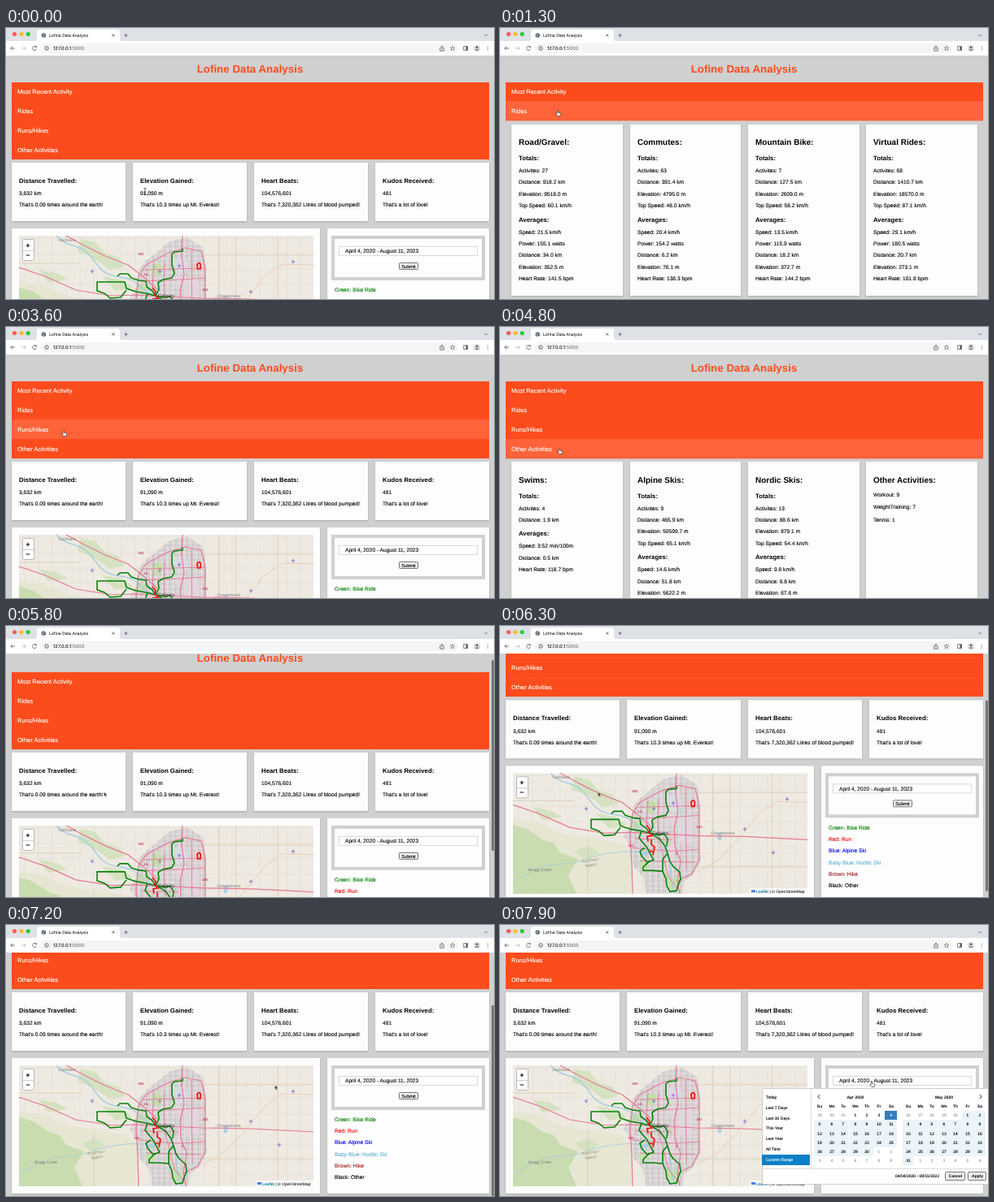
Write an HTML page that moves like this. It is 600 px wide and 334 px high and loops after 8 s.

```html
<!DOCTYPE html>
<html lang="en">
<head>
<meta charset="utf-8">
<title>Lofine Data Analysis</title>
<style>
html, body { margin: 0; width: 100%; height: 100%; overflow: hidden; }
body { position: relative; font-family: "Liberation Sans", Arial, sans-serif; text-rendering: geometricPrecision; color: #000; }
#stage { position: absolute; left: 0; top: 0; width: 600px; height: 334px; overflow: hidden; background: #d0d0d0; }
#stage svg { position: absolute; left: 0; top: 0; overflow: visible; }
#view { position: absolute; left: 0; top: 34px; width: 600px; height: 300px; overflow: hidden; }
#doc { position: absolute; left: 0; top: -34px; width: 600px; animation: scroll 8s infinite; }
#chrome { position: absolute; left: 0; top: 0; width: 600px; height: 34px; font-family: Inter, Roboto, sans-serif; }
/* Text is laid out ten times larger so that small sizes keep exact baselines */
.t { position: absolute; line-height: 0; white-space: nowrap; transform-origin: 0 0; transform: scale(.1); -webkit-text-stroke: 1.2px; }
.c { transform: scale(.1) translateX(-50%); }
.b { font-weight: bold; -webkit-text-stroke: 0; }
.box { position: absolute; box-sizing: border-box; }
.card { background: #fdfdfd; box-shadow: 0 .6px 2px rgba(0, 0, 0, .2); }
.btn { background: #efefef; border: .5px solid #777; border-radius: 1.3px; }

#flow { position: absolute; left: 6.5px; top: 66.6px; width: 587.5px; }
.item { position: relative; height: 23.75px; background: #fc4c1c; box-shadow: 0 .3px #fc4c1c; color: #fff; animation: 8s step-end infinite; }
.panel { position: relative; height: 0; overflow: hidden; animation: 8s ease-out infinite; }
.layer { position: absolute; left: -6.5px; top: 0; }
#rest { position: relative; }
#rest .layer { top: -161.6px; }

#rides { animation-name: hoverRides; }
#runs { animation-name: hoverRuns; }
#other { animation-name: hoverOther; }
#ridesPanel { --h: 220px; animation-name: openRides; }
#runsPanel { --h: 205.5px; animation-name: openRuns; }
#otherPanel { --h: 205px; animation-name: openOther; }
#picker { position: absolute; left: 0; top: 83px; animation: pick 8s step-end infinite; }
#thumb { left: 597px; top: 34px; width: 2.6px; height: 235px; border-radius: 1.3px; background: #767676; animation: thumbMove 8s infinite, thumbShow 8s infinite; }
#cursor { position: absolute; left: 0; top: 0; animation: move 8s ease-in-out infinite; }
#cursor g { animation: 8s step-end infinite; }
#cursor #beam { animation-name: beam; }
#cursor #hand { animation-name: hand; }
#cursor #arrow { animation-name: arrow; }

@keyframes hoverOther { 0% { background: #fc4c1c } 4% { background: #fe6339 } 5.2%, 47% { background: #fc4c1c } 47.2%, 62.5% { background: #fe6339 } 64%, 100% { background: #fc4c1c } }
@keyframes hoverRuns { 0% { background: #fc4c1c } 5.2% { background: #fe6339 } 6.4%, 23.5% { background: #fc4c1c } 23.7%, 46.8% { background: #fe6339 } 47%, 100% { background: #fc4c1c } }
@keyframes hoverRides { 0% { background: #fc4c1c } 6.4% { background: #fe6339 } 23.6%, 100% { background: #fc4c1c } }
@keyframes openRides { 0%, 10% { height: 0 } 12.5%, 20% { height: var(--h) } 22.5%, 100% { height: 0 } }
@keyframes openRuns { 0%, 26% { height: 0 } 28.5%, 42.5% { height: var(--h) } 45%, 100% { height: 0 } }
@keyframes openOther { 0%, 48.75% { height: 0 } 51.25%, 60% { height: var(--h) } 62.5%, 100% { height: 0 } }
@keyframes scroll {
  0%, 71% { transform: none; animation-timing-function: ease-in }
  72.5% { transform: translateY(-10px); animation-timing-function: cubic-bezier(.3, .3, .5, 1) }
  82%, 84% { transform: translateY(-84px) }
  87%, 100% { transform: translateY(-83px) }
}
@keyframes thumbMove {
  0%, 71% { transform: none; animation-timing-function: ease-in }
  72.5% { transform: translateY(8px); animation-timing-function: cubic-bezier(.3, .3, .5, 1) }
  82%, 100% { transform: translateY(65px) }
}
@keyframes thumbShow { 0%, 71% { opacity: 0 } 71.5%, 90% { opacity: 1 } 93%, 100% { opacity: 0 } }
@keyframes pick { 0% { visibility: hidden } 94.5%, 100% { visibility: visible } }
@keyframes move {
  0%, 1.2% { transform: translate(171px, 200px) }
  8.5%, 22.5% { transform: translate(71px, 102px) }
  25%, 45% { transform: translate(71px, 128px) }
  48%, 62.5% { transform: translate(73px, 150px) }
  69%, 86% { transform: translate(120.5px, 204.5px) }
  93%, 100% { transform: translate(457px, 193px) }
}
@keyframes beam { 0% { opacity: 1 } 3%, 100% { opacity: 0 } }
@keyframes hand { 0% { opacity: 0 } 3% { opacity: 1 } 64% { opacity: 0 } 92.5%, 100% { opacity: 1 } }
@keyframes arrow { 0% { opacity: 0 } 64% { opacity: 1 } 92.5%, 100% { opacity: 0 } }
</style>
</head>
<body>
<div id="stage">
  <div id="view">
    <div id="doc">
      <div id="title"></div>
      <div id="flow">
        <div class="item" id="recent"></div>
        <div class="item" id="rides"></div><div class="panel" id="ridesPanel"></div>
        <div class="item" id="runs"></div><div class="panel" id="runsPanel"></div>
        <div class="item" id="other"></div><div class="panel" id="otherPanel"></div>
        <div id="rest"><div class="layer">
          <div id="stats"></div>
          <div class="box card" style="left:6.7px;top:247px;width:379.5px;height:167px"></div>
          <svg width="600" height="420">
            <defs>
              <clipPath id="frame"><rect x="16" y="172" width="362" height="149"/></clipPath>
              <pattern id="farm" width="17" height="19" patternUnits="userSpaceOnUse"><path d="M0 4H17M6 0V19" stroke="#e2dad0" stroke-width=".6"/></pattern>
              <pattern id="blocks" width="7" height="6" patternUnits="userSpaceOnUse"><path d="M0 2H7M3 0V6" stroke="#f3f0ef" stroke-width=".6"/><path d="M5 0V6" stroke="#bfb8b9" stroke-width=".5"/></pattern>
            </defs>
            <g transform="translate(0 84)" clip-path="url(#frame)">
              <rect x="16" y="172" width="362" height="149" fill="#eeeae2"/>
              <rect x="16" y="172" width="362" height="149" fill="url(#farm)"/>
              <path d="M16 228L50 234 74 246 112 252 150 258 165 274 160 321H16Z" fill="#e6e6d3"/>
              <path d="M16 236L34 241 52 254 66 258 74 270 96 278 84 298 94 321H16Z" fill="#c9dcb0"/>
              <path d="M92 176l18 4 12 14 16 4 8 12-18 4-20-14-20-8zM40 214l22 4 14 8-24 4zM118 222l24 4 14 10-22 4zM92 268l18-6 12 8-16 10z" fill="#d5e2c1"/>
              <g id="city"></g>
              <path d="M179 211l8-6 6 5-3 11-9 1zM160 234l9-3 5 6-10 5zM205 299l12 4-2 14-10-4zM170 282l10-2 4 8-10 3z" fill="#c3deac"/>
              <path d="M206 200l15-3 4 18-16 4z" fill="#dadae4"/>
              <g fill="none" stroke="#a9cfdd">
                <path d="M62 172q8 9 20 12t18 9 14 17 26 13 26 12 18 9 14 10 8 20 4 22 6 25" stroke-width="1.5"/>
                <path d="M16 305q18-8 28-14t30-7 32-6 34-8 32 0 20-10" stroke-width=".9"/>
              </g>
              <ellipse cx="178" cy="271" rx="5" ry="2.5" fill="#a9cfdd"/>
              <ellipse cx="270" cy="251" rx="2.3" ry="4.5" fill="#a9cfdd"/>
              <g fill="none" stroke="#d8c9b2" stroke-width=".8"><path d="M283 172V321M262 172V321M334 172V321M241 196H378M241 287H378M16 206H92M108 254V321"/></g>
              <g fill="none" stroke="#e57a93" stroke-width="1.2" stroke-linejoin="round">
                <path d="M16 211L48 222 86 239 130 246 160 245 196 247 242 249 300 250 378 254"/>
                <path d="M74 172L96 184 122 197 150 208 168 222 186 238"/>
                <path d="M163 321L162 284 160 250 163 222 172 208 198 194 220 187 240 191 245 212 245 278 236 296 218 305"/>
                <path d="M217 172L216 196 219 220 214 240 215 262 222 280 218 305 221 321"/>
                <path d="M195 205L194 232 196 256 201 276 207 300 220 316M163 264L184 266 212 268 245 266M170 228L215 226 245 224M182 205L180 236M228 190L229 292M166 253L212 254M172 280L240 282M170 214L244 212" stroke-width=".9"/>
                <path d="M378 208L340 207 318 222 296 250 270 278 242 294" stroke="#edc3a4" stroke-width=".8"/>
              </g>
              <g fill="none" stroke="#08820b" stroke-width="1.6" stroke-linejoin="round">
                <path d="M137 222L140 219 150 219 154 224 163 227 172 228 173 235 180 240 184 246 172 243 160 241 148 237 146 229 112 229 112 240 121 243 128 249 141 248 148 239"/>
                <path d="M184 246L188 238 187 230 193 226 204 224 207 218 204 208 204 195 207 192 217 191 217 188"/>
                <path d="M174 243L171 252 176 258 181 264 185 272 189 279 181 282 174 274 172 268 178 264"/>
                <path d="M184 280L176 288 176 292 188 292 200 293 200 278 206 271 203 262 196 253 188 248"/>
                <path d="M206 271L209 281 213 287 221 294 222 303 219 310 217 317 209 318 205 311 204 302 200 293"/>
                <path d="M184 246L194 248 202 247 206 253 205 262"/>
              </g>
              <path d="M235 207l3-1.5 1.5 2-.5 5.5h-3.5zM180 236l4 5-1 4 4 4-6 1 1 6M186 254v6l4 3-1 5M184 268l5 1-1 4" fill="none" stroke="#f5100c" stroke-width="1.7"/>
              <g id="planes" fill="none" stroke="#8a6ed0" stroke-width="1"></g>
              <g font-size="5" fill="#777" text-anchor="middle">
                <text x="75" y="179">Cochrane</text><text x="49" y="293">Bragg Creek</text><text x="274" y="248">Chestermere</text>
                <g font-style="italic" fill="#8a8a70" transform="rotate(-9 111 282)"><text x="111" y="281">Tsuut'ina /</text><text x="111" y="287">Nation</text></g>
                <text x="197" y="248" font-size="6" fill="#333">Calgary</text>
                <g font-size="4.2" font-weight="bold" fill="#c8355d"><text x="166" y="196">201</text><text x="172" y="221">1A</text><text x="161" y="263">201</text><text x="217" y="273">2</text><text x="245" y="240">201</text></g>
              </g>
            </g>
          </svg>
          <div id="mapUi"></div>
          <div id="side"></div>
          <div id="picker"></div>
        </div></div>
      </div>
    </div>
  </div>
  <div id="chrome">
    <svg width="600" height="34">
      <rect width="600" height="34" fill="#dee1e6"/>
      <rect y="16" width="600" height="18" fill="#fff"/>
      <path d="M35 16q3 0 3-3V5q0-3 3-3H137q3 0 3 3V13q0 3 3 3Z" fill="#fff"/>
      <circle cx="10.5" cy="7.5" r="2.6" fill="#fc5b57"/><circle cx="18.8" cy="7.5" r="2.6" fill="#fdbc2e"/><circle cx="27.2" cy="7.5" r="2.6" fill="#28c840"/>
      <circle cx="46.3" cy="9" r="2.8" fill="#5f6368"/><path d="M44.5 8l2 1-1 2M47 6.8l1.2 1.4" stroke="#fff" stroke-width=".6" fill="none"/>
      <rect x="42" y="19" width="514" height="12" rx="6" fill="#f4f5f6"/>
      <g fill="none" stroke="#55595e" stroke-width=".8">
        <path d="M130.3 7.4l3.2 3.2m0-3.2l-3.2 3.2M145.4 9h4.2M147.5 6.9v4.2M588.3 8l1.8 1.8L591.9 8"/>
        <path d="M11 25H5.8m2.4-2.4L5.8 25l2.4 2.4"/>
        <path d="M19 25h5.2m-2.4-2.4l2.4 2.4-2.4 2.4" stroke="#b5b8bc"/>
        <path d="M37 23.4a2.5 2.5 0 1 0 .5 2.2M37.4 22v1.8h-1.8"/>
        <circle cx="50" cy="25" r="2.3"/><path d="M50 24.7v1.6M50 23.4v.6"/>
        <path d="M534.5 24.5h-.8v3.6h4.6v-3.6h-.8M536 26.5v-4.3m-1.4 1.3l1.4-1.4 1.4 1.4"/>
        <path d="M549 22.2l.8 1.9 2 .2-1.5 1.3.5 2-1.8-1.1-1.8 1.1.5-2-1.5-1.3 2-.2z" stroke-width=".6"/>
        <rect x="562.8" y="22.7" width="4.8" height="4.6"/>
      </g>
      <path d="M565.5 22.7h2.1v4.6h-2.1z" fill="#55595e"/>
      <circle cx="579" cy="25" r="4" fill="#d5d8dc"/><circle cx="579" cy="23.8" r="1.3" fill="#55595e"/><path d="M576.5 27.6q2.5-2.8 5 0z" fill="#55595e"/>
      <g fill="#55595e"><circle cx="592.3" cy="23" r=".6"/><circle cx="592.3" cy="25" r=".6"/><circle cx="592.3" cy="27" r=".6"/></g>
    </svg>
    <div id="bar"></div>
  </div>
  <div id="thumb" class="box"></div>
  <svg id="cursor" width="10" height="10">
    <g id="beam"><path d="M-1.5-2.8q1.5 0 1.5 1V4q0 1-1.5 1M1.5-2.8q-1.5 0-1.5 1M0 4q0 1 1.5 1" fill="none" stroke="#222" stroke-width=".7"/></g>
    <g id="hand"><path d="M-.9 0q.8-.8 1.4 0V2.2l2.4.6q.8.2.7 1.2L3.2 6.5H-.2L-2 4q-.2-.8.7-.5l.4.4z" fill="#fff" stroke="#222" stroke-width=".6"/></g>
    <g id="arrow"><path d="M0 0V5.6L1.3 4.4 2.2 6.4 3.2 5.9 2.3 4H4z" fill="#111" stroke="#fff" stroke-width=".5"/></g>
  </svg>
</div>
<script>
const put = (id, html) => document.getElementById(id).innerHTML = html;
// y is the vertical centre of the line
const text = (x, y, size, str, cls = '', css = '') =>
  `<span class="t ${cls}" style="left:${x}px;top:${y}px;font-size:${size * 10}px;${css}">${str}</span>`;
const box = (x, y, w, h, cls = '', css = '') =>
  `<div class="box ${cls}" style="left:${x}px;top:${y}px;width:${w}px;height:${h}px;${css}"></div>`;
const BODY = 6.67, H3 = 7.8, H2 = 10;

put('bar', text(53, 9.2, 5, 'Lofine Data Analysis', '', 'color:#333') +
  text(58, 25.4, 5.83, '127.0.0.1<span style="color:#777">:5000</span>', '', 'color:#222'));
put('title', text(300, 50.3, 13.33, 'Lofine Data Analysis', 'b c', 'color:#fc4c1c'));

const menu = { recent: 'Most Recent Activity', rides: 'Rides', runs: 'Runs/Hikes', other: 'Other Activities' };
for (const id in menu) put(id, text(7.5, 11.9, 7.5, menu[id]));

// Column text: heading, totals and averages split by ";", lines by "|"
function panel(id, cols) {
  const gap = 8.7, w = (572.7 - gap * (cols.length - 1)) / cols.length;
  const height = parseFloat(getComputedStyle(document.getElementById(id)).getPropertyValue('--h')) - 9;
  put(id, '<div class="layer">' + cols.map((col, i) => {
    const left = 14.3 + i * (w + gap), x = left + 9;
    const [head, ...parts] = col.split(';');
    let html = box(left, 4.5, w, height, 'card') + text(x, 27, H2, head, 'b');
    if (parts.length === 1)
      return html + parts[0].split('|').map((s, k) => text(x, 45.2 + k * 15.4, BODY, s)).join('');
    let y = 46;
    parts.forEach((part, k) => {
      html += text(x, y, H3, k ? 'Averages:' : 'Totals:', 'b');
      const lines = part.split('|');
      lines.forEach((s, n) => html += text(x, y + 16 + n * 14.4, BODY, s));
      y += 32.4 + (lines.length - 1) * 14.4;
    });
    return html;
  }).join('') + '</div>');
}
panel('ridesPanel', [
  'Road/Gravel:;Activites: 27|Distance: 918.2 km|Elevation: 9518.0 m|Top Speed: 60.1 km/h;Speed: 21.5 km/h|Power: 155.1 watts|Distance: 34.0 km|Elevation: 352.5 m|Heart Rate: 141.5 bpm',
  'Commutes:;Activites: 63|Distance: 391.4 km|Elevation: 4795.0 m|Top Speed: 48.0 km/h;Speed: 20.4 km/h|Power: 154.2 watts|Distance: 6.2 km|Elevation: 76.1 m|Heart Rate: 138.3 bpm',
  'Mountain Bike:;Activites: 7|Distance: 127.5 km|Elevation: 2609.0 m|Top Speed: 58.2 km/h;Speed: 13.5 km/h|Power: 115.9 watts|Distance: 18.2 km|Elevation: 372.7 m|Heart Rate: 144.2 bpm',
  'Virtual Rides:;Activites: 68|Distance: 1410.7 km|Elevation: 18570.0 m|Top Speed: 87.1 km/h;Speed: 29.1 km/h|Power: 180.5 watts|Distance: 20.7 km|Elevation: 273.1 m|Heart Rate: 161.8 bpm']);
panel('runsPanel', [
  'Outdoor Runs:;Activites: 20|Distance: 98.1 km|Elevation: 658.7 m;Speed: 5:43 min/km|Power: 341.6 watts|Distance: 4.9 km|Elevation: 32.9 m|Heart Rate: 166.1 bpm',
  'Virtual Runs:;Activites: 6|Distance: 42.1 km|Elevation: 0.0 m;Speed: 5:37 min\\km|Power: 0.0 watts|Distance: 7.0 km|Elevation: 0.0 m|Heart Rate: 160.1 bpm',
  'Hikes:;Activites: 7|Distance: 78.9 km|Elevation: 3439.0 m;Speed: 15:32 min/km|Distance: 11.3 km|Elevation: 491.3 m|Heart Rate: 125.4 bpm']);
panel('otherPanel', [
  'Swims:;Activites: 4|Distance: 1.9 km;Speed: 3:52 min/100m|Distance: 0.5 km|Heart Rate: 118.7 bpm',
  'Alpine Skis:;Activites: 9|Distance: 465.9 km|Elevation: 50599.7 m|Top Speed: 65.1 km/h;Speed: 14.6 km/h|Distance: 51.8 km|Elevation: 5622.2 m',
  'Nordic Skis:;Activites: 13|Distance: 88.6 km|Elevation: 879.1 m|Top Speed: 54.4 km/h;Speed: 9.8 km/h|Distance: 6.8 km|Elevation: 67.6 m',
  'Other Activities:;Workout: 9|WeightTraining: 7|Tennis: 1']);

put('stats', [
  ['Distance Travelled:', '3,632 km', "That's 0.09 times around the earth!"],
  ['Elevation Gained:', '91,090 m', "That's 10.3 times up Mt. Everest!"],
  ['Heart Beats:', '104,576,601', "That's 7,320,362 Litres of blood pumped!"],
  ['Kudos Received:', '481', "That's a lot of love!"]
].map(([head, value, note], i) => {
  const x = 6.7 + i * 149;
  return box(x, 166.2, 140.4, 71.8, 'card') + text(x + 9.3, 187.5, H3, head, 'b') +
    text(x + 9.3, 203.8, BODY, value) + text(x + 9.3, 218.2, BODY, note);
}).join(''));

const cityShape = 'M163 214L172 203 186 192 200 180 222 174 242 186 246 212 245 262 247 280 237 298 226 306 224 321H180L176 300 164 286 160 262 152 250 160 236Z';
put('city', ['#d4cfd0', 'url(#blocks)'].map(f => `<path d="${cityShape}" fill="${f}"/>`).join('') +
  '<path d="M219 226h18v32h-16zM208 222h8v12h-8zM206 262h9v22h-8z" fill="#e3d5dd"/>');
put('planes', [[213, 209], [189, 216], [353, 204], [106, 216], [301, 241], [336, 270]].map(([x, y]) =>
  `<path d="M${x - 2.2} ${y}h4.4M${x} ${y - 2.4}v4.8"/>`).join(''));

put('mapUi',
  box(20.3, 260.3, 14.4, 27, '', 'background:#fff;border:.8px solid #b9b9b9;border-radius:1.6px') +
  box(21, 273.6, 13, .5, '', 'background:#ccc') +
  text(27.4, 267.5, 9, '+', 'b c') + text(27.4, 280.3, 9, '−', 'b c') +
  box(306.5, 398, 71.5, 7, '', 'background:rgba(255,255,255,.8)') +
  box(308.7, 400, 5, 3.3, '', 'background:#4c7be1') +
  text(315, 401.7, 5, '<span style="color:#0078a8">Leaflet</span> | © OpenStreetMap', '', 'color:#333'));

const legend = [['Green: Bike Ride', 'green'], ['Red: Run', 'red'], ['Blue: Alpine Ski', 'blue'],
  ['Baby Blue: Nordic Ski', '#62b1d2'], ['Brown: Hike', '#a01c1c'], ['Black: Other', '#000']];
put('side', box(395, 247, 199, 167, 'card') +
  box(400.3, 255.7, 188.5, 55.5, '', 'background:#fdfdfd;border:4.3px solid #d0d0d0') +
  box(408.8, 268.7, 171.5, 12.8, '', 'background:#fff;border:.5px solid #dadada') +
  text(417, 275.2, 6.6, 'April 4, 2020 - August 11, 2023') +
  box(482.5, 289.3, 24, 9, 'btn') + text(494.5, 293.9, 5.55, 'Submit', 'c') +
  legend.map(([s, c], i) => text(404, 322.5 + i * 14.35, BODY, s, '', 'color:' + c)).join(''));

// Month grid: lead is the number of days shown before the 1st
function calendar(x0, name, lead, days, prevDays, from) {
  let html = text(x0 + 43.5, 211.6, 5, name, 'b c');
  ['Su', 'Mo', 'Tu', 'We', 'Th', 'Fr', 'Sa'].forEach((d, i) => html += text(x0 + i * 14.6, 223, 5, d, 'b c'));
  for (let i = 0; i < 42; i++) {
    const day = i - lead + 1, off = day < 1 || day > days;
    const n = day < 1 ? prevDays + day : off ? day - days : day;
    const x = x0 + (i % 7) * 14.6, y = 234.1 + Math.floor(i / 7) * 11.25;
    const active = day === from, inRange = !off && day >= (from || 1);
    if (inRange) html += box(x - 7.3, y - 5.6, 14.6, 11.25, '', `background:${active ? '#357ebd' : '#ebf4f8'}`);
    html += text(x, y, 5, n, 'c', `color:${off ? '#999' : active ? '#fff' : '#000'}`);
  }
  return html;
}
const ranges = ['Today', 'Last 7 Days', 'Last 30 Days', 'This Year', 'Last Year', 'All Time', 'Custom Range'];
const chevron = (x, dir) => `<svg width="1" height="1"><path d="M${x + dir} 209.3l${-2 * dir} 2.3 ${2 * dir} 2.3" fill="none" stroke="#000" stroke-width=".9"/></svg>`;
put('picker',
  box(322, 201.4, 279, 118.4, '', 'background:#fff;border:.5px solid #ccc;border-radius:1.7px') +
  box(322.3, 283, 59, 12.8, '', 'background:#0a80c6') +
  box(381.5, 202, .5, 98, '', 'background:#ddd') + box(322.3, 300, 278, .5, '', 'background:#ddd') +
  ranges.map((s, i) => text(327, 211.7 + i * 12.93, 5, s, '', i === 6 ? 'color:#fff' : '')).join('') +
  calendar(393, 'Apr 2020', 3, 30, 31, 4) + calendar(502, 'May 2020', 5, 31, 30, 0) +
  chevron(392, 1) + chevron(591, -1) +
  text(486, 309.4, 5, '04/04/2020 - 08/11/2023') +
  box(547, 304, 25.3, 10.8, 'btn') + text(559.6, 309.4, 5, 'Cancel', 'b c') +
  box(575, 304, 23, 10.8, 'btn') + text(586.5, 309.4, 5, 'Apply', 'b c'));
</script>
</body>
</html>
```
